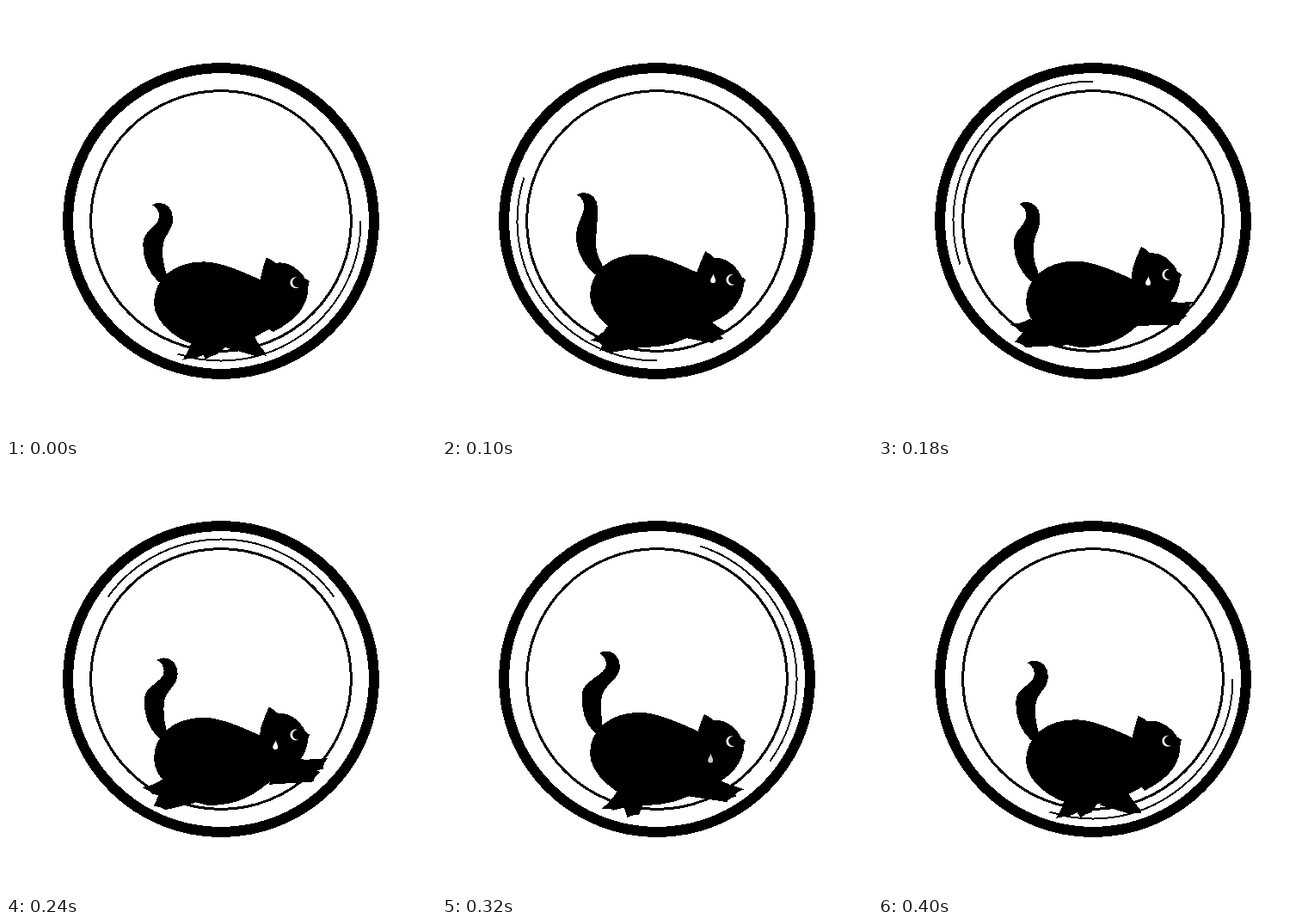
Animation of 500x500 px, one loop 420 ms. Source, as an HTML page:

```html
<!DOCTYPE html>
<html lang="en">
<head>
<meta charset="utf-8">
<title>Cat in a wheel</title>
<style>
html, body { margin: 0; width: 100%; height: 100%; overflow: hidden; background: #fff; }
svg { display: block; width: 100vw; height: 100vh; }
.crisp { shape-rendering: crispEdges; }
</style>
</head>
<body>
<svg viewBox="0 0 500 500">
  <g class="crisp" fill="none" stroke="#000">
    <circle cx="250" cy="250" r="178" stroke-width="12"/>
    <circle cx="250" cy="250" r="151.4" stroke-width="3"/>
    <path id="streak" stroke-width="2"/>
  </g>
  <g class="crisp">
    <path id="tail"/>
    <path id="body"/>
    <path id="legs"/>
  </g>
  <g id="head">
    <path class="crisp" d="M-41-8Q-37-20-30-34Q-24-31-20-26Q-6-27 5-14Q10-8 11-4L16 0L14 5Q13 19 1 33Q-11 45-34 53L-46 40Z"/>
    <path fill="#fff" d="M2.5-6.2A6.4 6.4 0 1 0 3.5 4.9A5.7 5.7 0 1 1 2.5-6.2Z"/>
  </g>
  <path id="tear" fill="#fff" d="M.5-5.5C1-2 3 0 3 2.2A3 3 0 0 1-3 2.2C-3 0-.5-2 .5-5.5Z"/>
</svg>
<script>
const STEP = 20, COUNT = 21, RAD = Math.PI / 180;
const $ = id => document.getElementById(id);
const pt = (x, y) => x.toFixed(2) + " " + y.toFixed(2);

// Point at a radius around the wheel's hub, degrees clockwise from the right.
const polar = (r, deg) => [250 + r * Math.cos(deg * RAD), 250 + r * Math.sin(deg * RAD)];

function streakPath(s) {
  const start = polar(162.5, s * 18), end = polar(162.5, s * 18 + 108);
  return `M${pt(...start)}A162.5 162.5 0 0 1 ${pt(...end)}`;
}

// Tip x, y and base x, y; the middle bulges left of the base.
function tailPath(x, y, bx, by) {
  const mx = bx - 19 + (x - bx) * .25, my = by - 41;
  return `M${pt(x, y)}C${pt(x + 9, y - 6)} ${pt(x + 24, y - 1)} ${pt(x + 24, y + 16)}`
    + `C${pt(x + 24, y + 31)} ${pt(mx + 24, my - 12)} ${pt(mx + 23, my + 4)}`
    + `Q${pt(mx + 22, my + 17)} ${pt(bx + 5, by - 9)}L${pt(bx + 10, by + 10)}L${pt(bx - 4, by + 2)}`
    + `C${pt(bx - 15, by - 8)} ${pt(mx, my + 18)} ${pt(mx, my)}`
    + `C${pt(mx, my - 18)} ${pt(x + 8, y + 26)} ${pt(x + 8, y + 13)}Q${pt(x + 8, y + 5)} ${pt(x, y)}Z`;
}

function bodyPath(top, ex, ey) {
  const left = top + 48;
  return `M172 ${left}C172 ${left - 28} 195 ${top} 230 ${top}`
    + `C250 ${top} 276 ${top + 12} 298 ${top + 22}L${pt(ex, ey + 30)}`
    + `Q${pt(ex - 16, ey + 46)} ${pt(302, 378 + (ey - 322) * .7)}`
    + `C280 392 258 397 235 397C203 ${left + 49} 172 ${left + 24} 172 ${left}Z`;
}

// A leg from its outer root to the paw and back to its inner root.
// swing is the paw's angle from straight down; side is 1 in front, -1 behind.
function legPath([ax, ay, bx, by], side, swing, radius) {
  const [x, y] = polar(radius, 90 - swing);
  const sole = ((side > 0 ? 180 : 0) - (swing - side * 19) * 1.9) * RAD;
  const u = x + 14 * Math.cos(sole), v = y + 14 * Math.sin(sole);
  const cx = (ax + bx) / 2, cy = (ay + by) / 2;
  const bend = (px, py, qx, qy, k) =>
    pt((px + qx) / 2 * (1 - k) + cx * k, (py + qy) / 2 * (1 - k) + cy * k);
  return `M${pt(ax, ay)}Q${bend(ax, ay, x, y, .15)} ${pt(x, y)}`
    + `Q${bend(x, y, u, v, .1)} ${pt(u, v)}L${pt(bx, by)}L${pt(cx, cy - 12)}Z`;
}

function draw(now) {
  const s = Math.floor((now + .5) / STEP) % COUNT;
  const turn = s / COUNT * 360;
  const wave = (mean, amp, shift) => mean + amp * Math.cos((turn + shift) * RAD);
  const bob = Math.cos((2 * turn + 15) * RAD);

  const top = 293 + 4.5 * bob;
  const ex = 337, ey = wave(319, 5, 26) - 1.5 * bob;
  const tilt = wave(-3.5, -3, 20) - 1.5 * bob;
  const hind = [wave(196, 21, 17), wave(376, 12, 17), wave(240, 20, -20), 394];
  const fore = [wave(315, -26, -5), wave(362, 21, 0), wave(280, -26, -15), wave(384, 13, 5)];

  $("streak").setAttribute("d", streakPath(s));
  $("tail").setAttribute("d", tailPath(wave(170, 13, 90), 225.5 + 6 * bob, 181, top + 21));
  $("body").setAttribute("d", bodyPath(top, ex, ey));
  $("legs").setAttribute("d",
    legPath(hind, -1, wave(-19, 14, 25), wave(165, -3, 0))
    + legPath(hind, -1, wave(-27, 12, 15), wave(161, 7, 20))
    + legPath(fore, 1, wave(33, -14.5, -10), wave(161, 6, 40))
    + legPath(fore, 1, wave(36.5, -18, -10), wave(157, 8, 50)));
  $("head").setAttribute("transform", `translate(${pt(ex, ey)}) rotate(${tilt.toFixed(2)})`);

  const fall = 317 + .23 * (s - 5.5) ** 2;
  $("tear").setAttribute("transform", `translate(${pt(316.5 - .27 * s, fall)})`);
  $("tear").setAttribute("opacity", Math.max(0, Math.min(1, s / 4.5, (20 - s) / 5)).toFixed(3));
}

function loop(now) {
  draw(now);
  requestAnimationFrame(loop);
}
draw(0);
requestAnimationFrame(loop);
</script>
</body>
</html>
```
